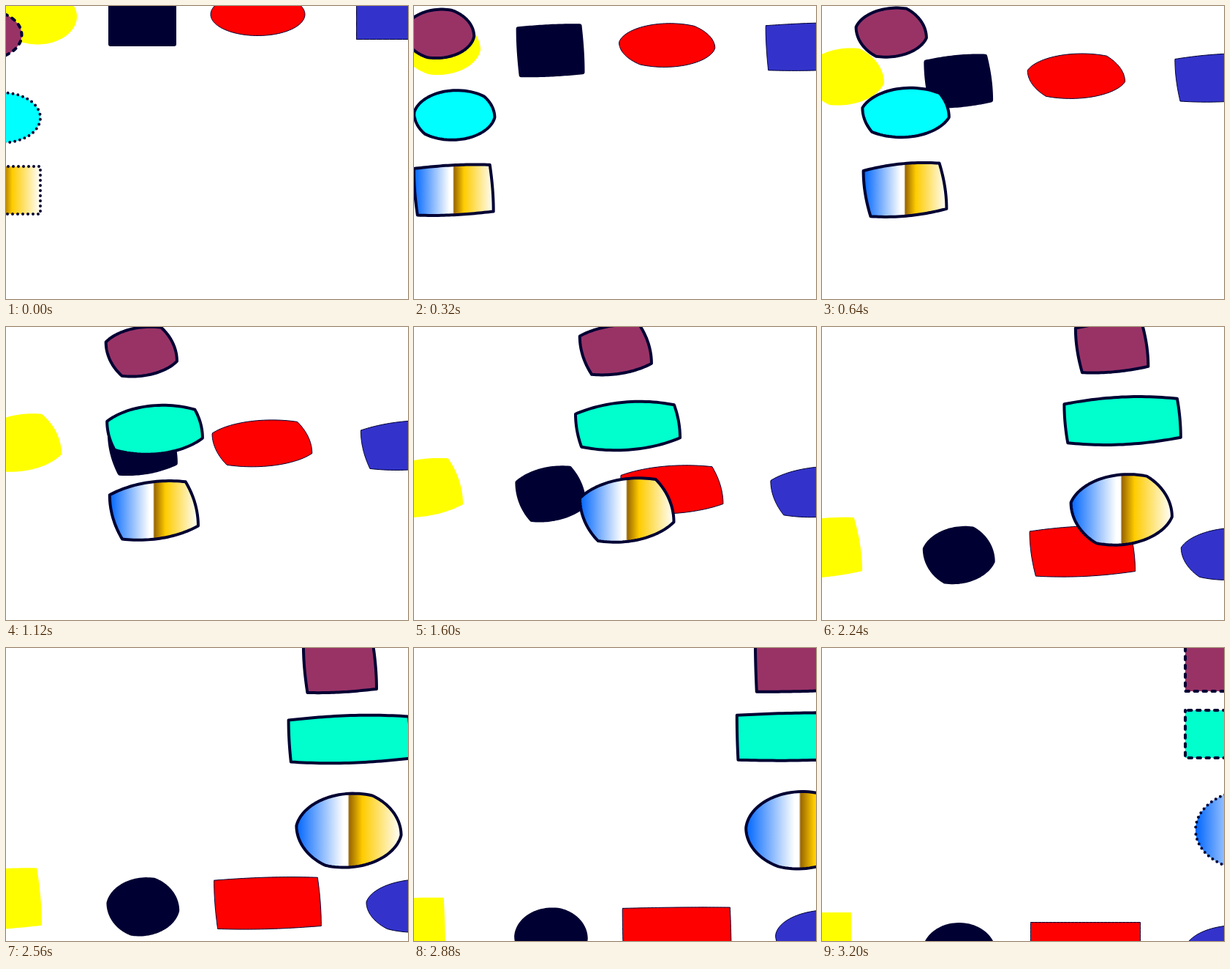
Write an HTML page with a canvas that moves like this. It is 550 px wide and 400 px high and loops after 3360 ms.

```html
<!DOCTYPE html>
<html lang="en">
<head>
<meta charset="utf-8">
<title>Shape morphs</title>
<style>
  html, body { margin: 0; width: 100%; height: 100%; overflow: hidden; background: #fff; }
  canvas { display: block; }
</style>
</head>
<body>
<canvas id="stage" width="550" height="400"></canvas>
<script>
const ctx = document.getElementById('stage').getContext('2d');
const STEP = 160, STEPS = 21, SIDE_POINTS = 30;
const NAVY = '#000033';
const DOTS = [0, 7], DASHES = [4.5, 7.5];

// ellipse: [cx, cy, rx, ry]; rect: [left, top, right, bottom]; last: final step of the morph
const shapes = [
  { ellipse: [43, 14.5, 54, 38], rect: [-72, 361, 40, 447], last: 19, fill: '#ffff00' },
  { ellipse: [187.5, 416, 47.5, 38], rect: [143, -14, 230, 52], last: 19,
    toEllipse: true, fill: NAVY, line: 6 },
  { ellipse: [344.5, 11.5, 64.5, 29], rect: [285.5, 374.5, 435.5, 448.5], last: 19, fill: '#ff0000', line: 1 },
  { ellipse: [567.5, 415.5, 72, 37], rect: [479.5, -19, 614.5, 45.5], last: 19,
    toEllipse: true, fill: '#3333cc', line: 1 },
  { ellipse: [-26, 39.5, 47.5, 33], rect: [497, -12, 598, 59], last: 19,
    fill: '#993366', line: 4, startDash: DASHES, endDash: DASHES },
  { ellipse: [-4, 152.5, 51, 34], rect: [497, 85, 681, 150], last: 20,
    fill: step => step < 6 ? '#00ffff' : '#00ffcc', line: 4, startDash: DOTS, endDash: DASHES },
  { ellipse: [587.5, 248.5, 76.5, 55], rect: [-57, 219, 47, 284], last: 20,
    toEllipse: true, fill: chrome, line: 4, startDash: DOTS, endDash: DOTS },
];

const mix = (a, b, t) => a + (b - a) * t;

function chrome(step, points) {
  const xs = points.map(p => p[0]);
  const gradient = ctx.createLinearGradient(Math.min(...xs), 0, Math.max(...xs), 0);
  [[0, '#0066ff'], [.45, '#fff'], [.49, '#fff'], [.505, '#960'], [.63, '#fc0'], [1, '#fff']]
    .forEach(stop => gradient.addColorStop(...stop));
  return gradient;
}

// Walks both outlines clockwise: the top left corner pairs with the ellipse's
// left end, and each side covers an arc in proportion to its length.
function outline({ ellipse: [cx, cy, rx, ry], rect: [l, t, r, b] }, roundness) {
  const corners = [[l, t], [r, t], [r, b], [l, b], [l, t]];
  const turn = Math.PI * (r - l) / (r - l + b - t);
  const angles = [0, turn, Math.PI, Math.PI + turn, 2 * Math.PI];
  const points = [];
  for (let side = 0; side < 4; side++) {
    const [x0, y0] = corners[side], [x1, y1] = corners[side + 1];
    for (let i = 0; i < SIDE_POINTS; i++) {
      const k = i / SIDE_POINTS;
      const angle = mix(angles[side], angles[side + 1], k);
      points.push([
        mix(mix(x0, x1, k), cx - rx * Math.cos(angle), roundness),
        mix(mix(y0, y1, k), cy - ry * Math.sin(angle), roundness),
      ]);
    }
  }
  return points;
}

function drawShape(shape, step) {
  const t = Math.min(step / shape.last, 1);
  const points = outline(shape, shape.toEllipse ? t : 1 - t);
  ctx.beginPath();
  points.forEach(([x, y]) => ctx.lineTo(x, y));
  ctx.closePath();
  ctx.fillStyle = typeof shape.fill === 'function' ? shape.fill(step, points) : shape.fill;
  ctx.fill();
  if (!shape.line) return;
  const dash = t === 0 ? shape.startDash : t === 1 ? shape.endDash : null;
  ctx.setLineDash(dash || []);
  ctx.lineWidth = shape.line;
  ctx.stroke();
}

function render() {
  const step = Math.floor(performance.now() / STEP) % STEPS;
  ctx.fillStyle = '#fff';
  ctx.fillRect(0, 0, 550, 400);
  ctx.strokeStyle = NAVY;
  ctx.lineJoin = ctx.lineCap = 'round';
  ctx.lineDashOffset = -4;
  shapes.forEach(shape => drawShape(shape, step));
  requestAnimationFrame(render);
}
render();
</script>
</body>
</html>
```
